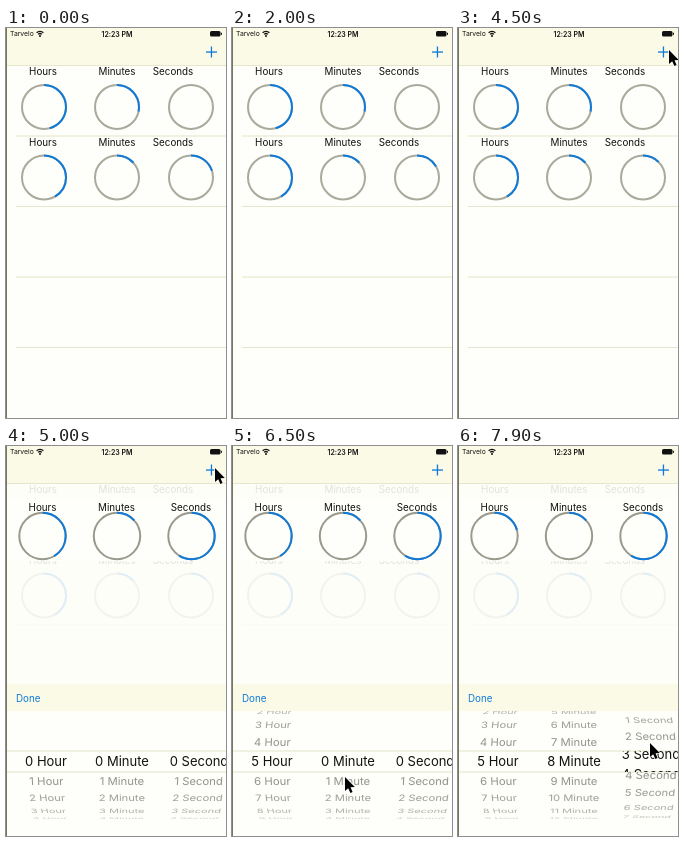
These frames come from a looping animation (220x390 px, 8 s). An HTML page with a canvas:

```html
<!DOCTYPE html>
<html lang="en">
<head>
<meta charset="utf-8">
<title>Timers</title>
<style>
html, body { margin: 0; width: 100%; height: 100%; overflow: hidden; background: #fefefa; }
canvas { display: block; width: 220px; height: 390px; }
</style>
</head>
<body>
<canvas id="stage"></canvas>
<script>
const W = 220, H = 390, LOOP = 8000;
const BLUE = '#0f7ad8', PAPER = '#fefefa', BAR = '#fafae6', LINE = '#e6e6cc', INK = '#111';
const UNITS = ['Hour', 'Minute', 'Second'];
const canvas = document.getElementById('stage');
const dpr = window.devicePixelRatio || 1;
canvas.width = W * dpr;
canvas.height = H * dpr;
const c = canvas.getContext('2d');

// Key points are [time, value, value, ...]
const POINTER = [[3800, 224, 290], [4350, 211, 22], [4600, 211, 22], [5000, 209, 22],
  [5400, 44, 340], [5750, 46, 288], [6050, 48, 300], [6400, 113, 331], [6500, 113, 331],
  [6750, 116, 288], [6900, 116, 290], [7200, 112, 347], [7500, 190, 350], [7900, 192, 297], [8000, 192, 290]];
const WHEELS = [
  [[5400, 0], [5750, 2.9], [6050, 4.6], [6350, 5]],
  [[6500, 0], [6750, 3.4], [6950, 6.3], [7200, 7.8], [7400, 8]],
  [[7500, 0], [7650, 1.1], [7900, 3.33], [8000, 4]]
];

const clamp = x => Math.max(0, Math.min(1, x));
const smooth = x => x * x * (3 - 2 * x);

function track(keys, t, ease = x => x) {
  let i = 1;
  while (i < keys.length - 1 && t > keys[i][0]) i++;
  const a = keys[i - 1], b = keys[i];
  const k = ease(clamp((t - a[0]) / (b[0] - a[0])));
  return a.slice(1).map((v, n) => v + (b[n + 1] - v) * k);
}

function box(x, y, w, h, color) {
  c.fillStyle = color;
  c.fillRect(x, y, w, h);
}

// y is the middle of the capital letters
function text(s, x, y, size, color = INK, align = 'center', weight = 400) {
  c.font = `${weight} ${size}px Inter, "Liberation Sans", sans-serif`;
  c.fillStyle = color;
  c.textAlign = align;
  c.fillText(s, x, y + size * 0.364);
}

function arc(x, y, r, part, color, width) {
  c.beginPath();
  c.arc(x, y, r, -Math.PI / 2, -Math.PI / 2 + part * Math.PI * 2);
  c.strokeStyle = color;
  c.lineWidth = width;
  c.stroke();
}

function dials(y, labelY, labelX, xs, r, parts, gray) {
  xs.forEach((x, i) => {
    text(UNITS[i] + 's', labelX[i], labelY, 9.8);
    arc(x, y, r, 1, gray, 2);
    if (parts[i] > 0) arc(x, y, r, parts[i], BLUE, 2);
  });
}

function statusBar() {
  box(0, 0, W, 38, BAR);
  box(0, 37, W, 1, LINE);
  text('Tarvelo', 4, 6, 6.8, INK, 'left');
  text('12:23 PM', 111, 6, 7, INK, 'center', 600);
  c.strokeStyle = INK;
  c.lineWidth = 1.3;
  for (const r of [2.6, 4.8]) {
    c.beginPath();
    c.arc(34, 8.2, r, -Math.PI * 0.75, -Math.PI * 0.25);
    c.stroke();
  }
  c.beginPath();
  c.arc(34, 8, 1, 0, 7);
  c.fillStyle = INK;
  c.fill();
  c.beginPath();
  c.roundRect(204, 3, 10.5, 5.5, 1.5);
  c.fill();
  box(215, 4.8, 1, 2, INK);
  box(200, 23.4, 11, 1.3, BLUE);
  box(204.8, 18.5, 1.3, 11, BLUE);
}

function list(t) {
  const xs = [38, 111, 185], labels = [37, 111, 167];
  dials(79, 43.5, labels, xs, 22, [11 / 24, 17 / 60, 0], '#a9a99c');
  dials(149.5, 114, labels, xs, 22, [10 / 24, 8 / 60, (12 - t / 1000) / 60], '#a9a99c');
  for (let i = 0; i < 4; i++) box(10, 107.5 + i * 70.5, W - 10, 1, LINE);
}

// One turning column, rows set on a cylinder
function wheel(cx, unit, pos) {
  const R = 58, STEP = 0.342, MID = 315.5;
  const rows = (size, color, flat) => {
    for (let n = Math.max(0, Math.ceil(pos - 4)); n <= pos + 4; n++) {
      const a = (n - pos) * STEP, cos = Math.cos(a);
      if (cos < 0.12) continue;
      const dx = cx - 110, depth = 0.07;
      c.save();
      if (flat) c.translate(cx, MID + (n - pos) * 20);
      else c.transform(1 - depth * (1 - cos), 0, -dx * depth * 1.6 * Math.sin(a) / R, cos,
        110 + dx * (1 - depth * (1 - cos)), MID + R * Math.sin(a));
      c.globalAlpha *= flat ? 1 : 0.35 + 0.65 * cos;
      text(`${n} ${unit}`, 0, 0, size, color);
      c.restore();
    }
  };
  const clipped = (areas, draw) => {
    c.save();
    c.beginPath();
    areas.forEach(([y, h]) => c.rect(0, y, W, h));
    c.clip();
    draw();
    c.restore();
  };
  clipped([[265, 40], [326, 64]], () => rows(11.4, '#8f8f88', false));
  clipped([[305, 21]], () => rows(13, INK, true));
}

function editor(t) {
  c.save();
  c.globalAlpha = smooth(clamp((t - 4600) / 300));
  const alpha = c.globalAlpha;
  c.globalAlpha = alpha * 0.88;
  box(0, 38, W, H - 38, PAPER);
  c.globalAlpha = alpha;
  box(0, 52, W, 63, PAPER);
  const hours = 10 - 5 * smooth(clamp((t - 6550) / 250));
  dials(90, 61, [36.5, 110.5, 185], [36.5, 111, 185.5], 23.2, [hours / 24, 8 / 60, 0.59], '#99998c');
  box(0, 238, W, 27, BAR);
  box(0, 265, W, H - 265, PAPER);
  text('Done', 10, 252, 9.8, BLUE, 'left');
  box(0, 304.5, W, 1, LINE);
  box(0, 325.5, W, 1, LINE);
  [40, 116, 193].forEach((x, i) => wheel(x, UNITS[i], track(WHEELS[i], t)[0]));
  c.restore();
}

function pointer(t) {
  const [x, y] = track(POINTER, t, smooth);
  const shape = [[0, 0], [0, 14], [3.2, 11.2], [5.4, 16], [7.6, 15], [5.5, 10.3], [9.8, 10]];
  c.beginPath();
  shape.forEach(([dx, dy]) => c.lineTo(x + dx, y + dy));
  c.closePath();
  c.strokeStyle = '#fff';
  c.lineWidth = 1.4;
  c.stroke();
  c.fillStyle = '#000';
  c.fill();
}

function draw(now) {
  const t = now % LOOP;
  c.setTransform(dpr, 0, 0, dpr, 0, 0);
  box(0, 0, W, H, PAPER);
  list(t);
  if (t > 4600) editor(t);
  statusBar();
  box(0, 0, 1, H, '#77775c');
  if (t > 3800) pointer(t);
}

const start = performance.now();
function frame() {
  draw(performance.now() - start);
  requestAnimationFrame(frame);
}
frame();
</script>
</body>
</html>
```
